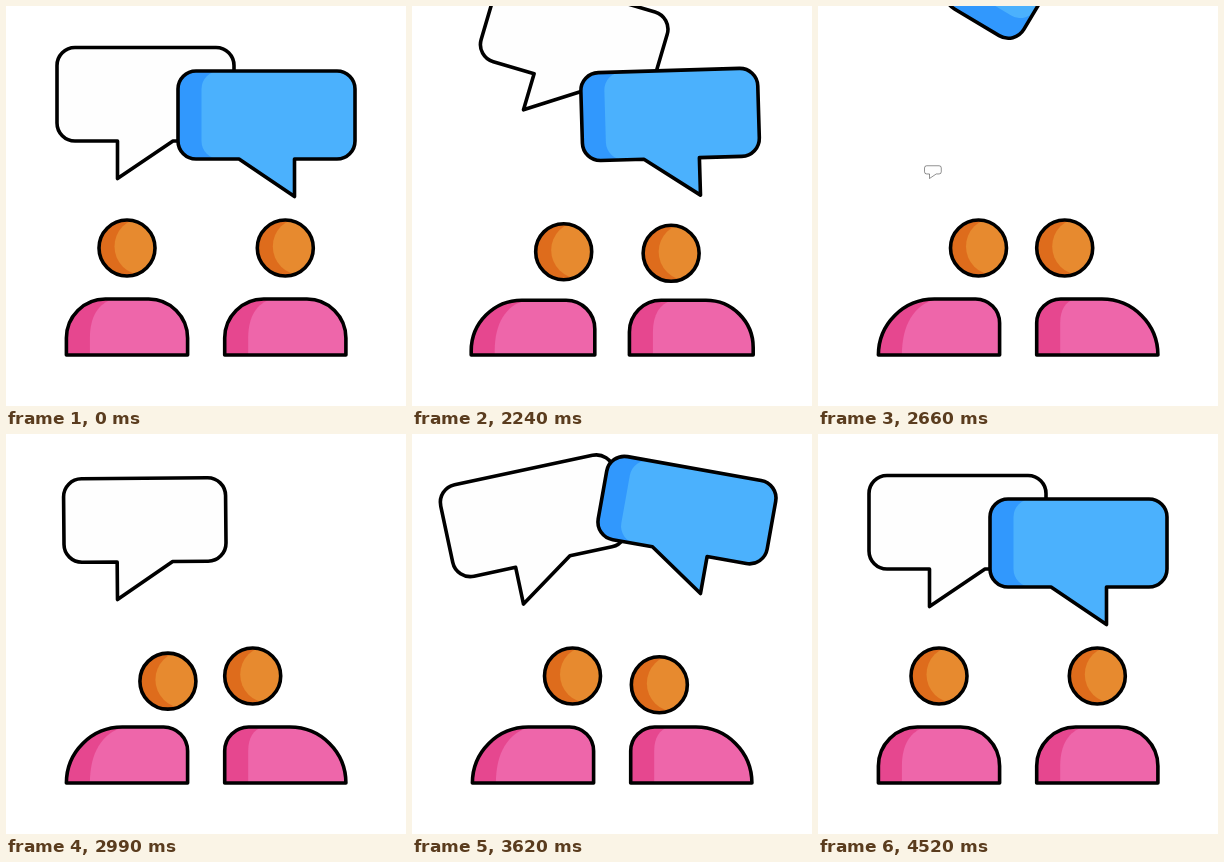
An HTML page for the animation above (4.55 s loop, 400 by 400 pixels).

```html
<!DOCTYPE html>
<html lang="en">
<head>
<meta charset="utf-8">
<title>Conversation</title>
<style>
html, body { margin: 0; width: 100%; height: 100%; overflow: hidden; background: #fff; }
svg { display: block; width: 100%; height: 100%; }
.line { fill: none; stroke: #000; stroke-width: 3.6; stroke-linejoin: round; }
</style>
</head>
<body>
<svg id="stage" viewBox="0 0 400 400"></svg>
<script>
const LOOP = 4550, HOLD = 2030, STEP = 30;
const NS = 'http://www.w3.org/2000/svg';
const stage = document.getElementById('stage');

function make(parent, tag, attrs = {}) {
  const el = document.createElementNS(NS, tag);
  for (const k in attrs) el.setAttribute(k, attrs[k]);
  return parent.appendChild(el);
}
const setD = (el, d) => el.setAttribute('d', d);
const span = (t, a, b) => Math.min(1, Math.max(0, (t - a) / (b - a)));
const ease = p => p * p * (3 - 2 * p);
const glide = (t, a, b) => ease(span(t, a, b));
const hump = p => Math.max(0, Math.sin(Math.PI * p));

// Speech bubbles: drawn around the tip of the tail, tail on the left side.
function bubblePath(a, b, h) {
  const r = 18, y = -37.5;
  return `M0 0V${y}H${r - a}a${r} ${r} 0 0 1 ${-r} ${-r}V${y - h + r}` +
    `a${r} ${r} 0 0 1 ${r} ${-r}H${b - r}a${r} ${r} 0 0 1 ${r} ${r}V${y - r}` +
    `a${r} ${r} 0 0 1 ${-r} ${r}H55.5Z`;
}

function makeBubble(o) {
  const g = make(stage, 'g');
  const base = make(g, 'path', { fill: o.dark });
  const face = make(g, 'path', { fill: o.light });
  const line = make(g, 'path', { class: 'line' });

  return t => {
    const u = t - o.delay;
    let rot = 0, dy = 0, size = 1, less = 0;
    if (u >= 2640) {
      size = 1 - (1 - span(u, 2640, 2960)) ** 2;
      less = 7.5 * Math.max(0, 3200 - u) / 210;
      rot = -o.side * 16 * (glide(u, 2960, 3240) - glide(t, o.settle, o.settle + 355));
      dy = -o.lift * (glide(u, 2870, 3110) - glide(u, 3240, 3760));
    } else if (t >= HOLD) {
      const e = o.exit, p = Math.max(0, t - e.start) / (2420 - e.start);
      rot = o.side * e.rot * p ** 1.8;
      dy = -e.rise * p ** e.power;
    }
    const a = 60.5 - less, b = 116.5 - less, h = o.high - less * 4 / 3;
    const shape = bubblePath(a, b, h);
    setD(base, shape);
    setD(line, shape);
    setD(face, bubblePath(a, b - o.band, h));
    g.setAttribute('transform',
      `translate(${o.x} ${o.y + dy}) rotate(${rot}) scale(${o.side * size} ${size})`);
    g.style.display = size > 0.01 && dy > -330 ? '' : 'none';
  };
}

// People: a head that slides towards the other one and a body that leans with it.
function makePerson(o) {
  const clipBody = make(make(stage, 'clipPath', { id: o.id + 'b' }), 'path');
  make(make(stage, 'clipPath', { id: o.id + 'h' }), 'circle', { r: 28 });
  const body = make(stage, 'g');
  const inner = make(body, 'g', { 'clip-path': `url(#${o.id}b)` });
  make(inner, 'rect', { x: -70, y: -60, width: 140, height: 62, fill: '#e6478f' });
  const pink = make(inner, 'path', { fill: '#ee66aa' });
  const line = make(body, 'path', { class: 'line' });

  const head = make(stage, 'g');
  make(head, 'circle', { r: 28, fill: '#de6c1c' });
  const shine = make(head, 'g', { 'clip-path': `url(#${o.id}h)` });
  make(shine, 'circle', { cx: 16, cy: -1.5, r: 28.5, fill: '#e78a2f' });
  make(head, 'circle', { r: 28, class: 'line' });

  return t => {
    const go = t < HOLD ? 0 : span(t, o.go[0], o.go[1]);
    const home = span(t, o.home[0], o.home[1]);
    const lean = ease(go) - ease(home);
    const rebound = hump(span(t, o.go[1], o.go[1] + 70)) +
      hump(span(t, o.home[1], o.home[1] + 70));
    const nod = span(t - o.delay, 2920, 3280);
    const x = o.x + o.side * (o.reach * lean + 1.5 * Math.sin(2 * Math.PI * nod));
    const y = 242 + 5.7 * hump(lean) + 9 * hump(nod) - rebound;
    head.setAttribute('transform', `translate(${x} ${y})`);

    const busy = Math.max(hump(go), hump(home));
    const squash = 1.3 * busy ** 0.4 - 0.9 * rebound;
    const w = 60.6 + squash, h = 56 - squash;
    const bend = Math.max(0, lean) ** 1.5;
    const far = 39 + 17 * bend, near = 39 - 15 * bend;
    const l = Math.min(h, o.side > 0 ? far : near);
    const r = Math.min(h, o.side > 0 ? near : far);
    const shape = `M${-w} 0V${l - h}A${l} ${l} 0 0 1 ${l - w} ${-h}` +
      `H${w - r}A${r} ${r} 0 0 1 ${w} ${r - h}V0Z`;
    setD(clipBody, shape);
    setD(line, shape);
    const s = 23.5 - w, k = l * 0.6;
    setD(pink, `M${s} 2V${l - h}C${s} ${l * 0.45 - h} ${s + k * 0.37} ${l * 0.11 - h} ${s + k} ${-h}H70V2Z`);
    body.setAttribute('transform', `translate(${o.x} 349)`);
  };
}

const parts = [
  makeBubble({
    x: 111.5, y: 172.5, side: 1, high: 93.5, band: 0, lift: 14,
    dark: '#fefefe', light: '#fefefe', delay: 0, settle: 3505,
    exit: { start: 2000, rot: 45, rise: 214, power: 2.03 }
  }),
  makeBubble({
    x: 288.5, y: 190.5, side: -1, high: 88, band: 23.5, lift: 31,
    dark: '#3198fd', light: '#4bb1fd', delay: 495, settle: 3960,
    exit: { start: 2172, rot: 17.5, rise: 40, power: 2.6 }
  }),
  makePerson({
    id: 'l', x: 121, side: 1, reach: 39.5, go: [1990, 2350], home: [4050, 4430], delay: 0
  }),
  makePerson({
    id: 'r', x: 279.3, side: -1, reach: 32.6, go: [2040, 2385], home: [3830, 4140], delay: 495
  })
];

function draw(ms) {
  let t = ms % LOOP;
  t = t < HOLD ? 0 : HOLD + Math.floor((t - HOLD) / STEP) * STEP;
  for (const part of parts) part(t);
}

let begin = null;
function tick(now) {
  if (begin === null) begin = now;
  draw(Math.max(0, now - begin));
  requestAnimationFrame(tick);
}
draw(0);
requestAnimationFrame(tick);
</script>
</body>
</html>
```
